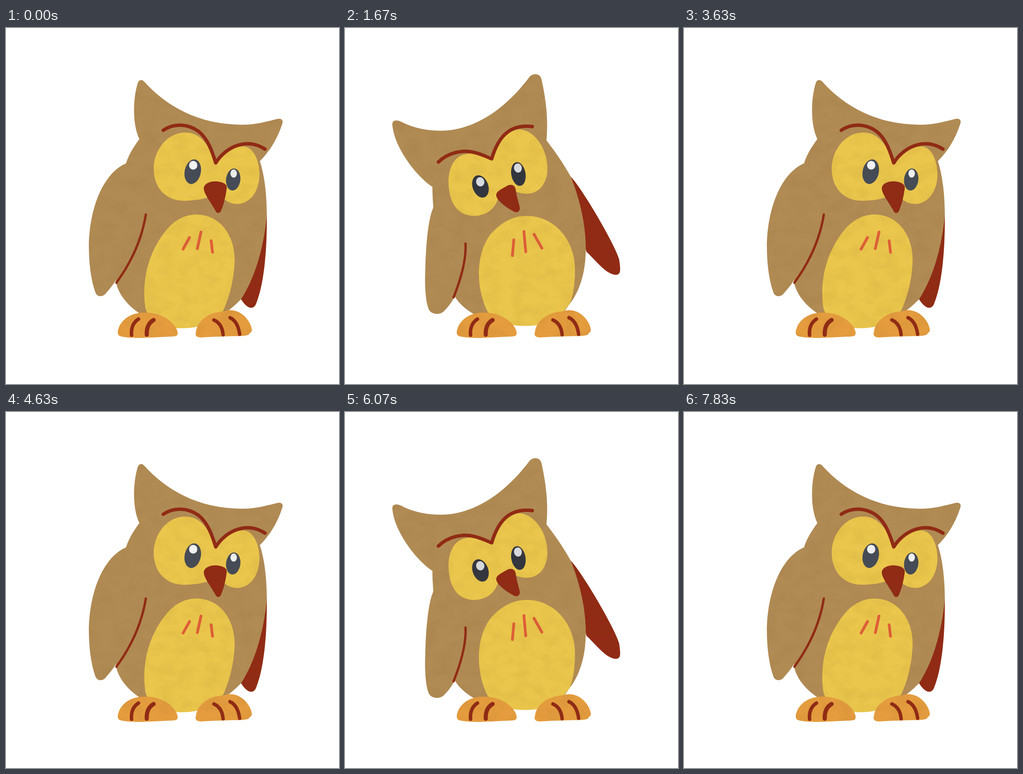
Recreate the animation shown at these times as an HTML page. Size 724 by 773 pixels, loop 7.91 s.

```html
<!DOCTYPE html>
<html lang="en">
<head>
<meta charset="utf-8">
<title>Owl</title>
<style>
html, body { margin: 0; width: 100%; height: 100%; overflow: hidden; background: #fff; }
svg { display: block; width: 100vw; height: 100vh; }
.brown { fill: #b18b54; }
.yellow { fill: #eac64c; }
.red { fill: #912b15; }
.orange { fill: #e49c3e; }
.line { fill: none; stroke: #912b15; stroke-width: 7.5; stroke-linecap: round; stroke-linejoin: round; }
.thin { stroke-width: 5; }
.mark { stroke: #df5f38; stroke-width: 6; }
</style>
</head>
<body>
<svg viewBox="0 0 724 773">
  <filter id="paper" filterUnits="userSpaceOnUse" x="0" y="0" width="724" height="773" color-interpolation-filters="sRGB">
    <feTurbulence id="grain" type="fractalNoise" baseFrequency=".03 .04" numOctaves="5" seed="1"/>
    <feColorMatrix values="0 0 0 0 .45  0 0 0 0 .3  0 0 0 0 .1  .15 0 0 0 -.06"/>
    <feComposite operator="in" in2="SourceAlpha" result="mottle"/>
    <feMerge><feMergeNode in="SourceGraphic"/><feMergeNode in="mottle"/></feMerge>
  </filter>
  <g filter="url(#paper)">
    <g id="owl"></g>
    <path class="orange" d="M243 660C245 640 265 618 300 618C340 617 369 640 373 660C374 668 371 670 360 670C330 671 300 673 290 673C270 673 250 671 246 668C243 665 243 663 243 660Z
      M413 660C415 640 435 617 475 615C482 612 487 613 493 613C515 616 531 637 534 652C536 660 532 660 529 664C528 667 522 668 510 669C480 669 440 671 425 672C412 672 411 666 413 660Z"/>
    <path class="line" d="M288 632Q271 643 273 667M452 634Q470 642 472 666M487 629Q504 637 508 665"/>
    <path class="line" style="stroke-width:9" d="M321 634Q305 643 306 666"/>
  </g>
</svg>
<script>
const LOOP = 7910;

// Part name -> class, in drawing order. Ovals hold: cx cy rx ry angle.
const parts = {
  farWing: 'red', body: 'brown', wing: 'brown', wingLine: 'line thin', belly: 'yellow',
  marks: 'line mark', face: 'yellow', brow: 'line', beak: 'red',
  eye1: 'pupil', eye2: 'pupil', glint1: 'glint', glint2: 'glint'
};

// Looking right, wings folded
const right = {
  farWing: 'M567 400C568 470 563 550 544 598C540 608 534 609 527 606C520 602 515 595 511 589L530 450Z',
  body: 'M287 118C290 112 296 111 301 117C350 171 420 210 514 210C545 210 570 202 592 197C602 196 603 203 600 210C590 240 575 266 552 289C562 320 567 360 567 408C560 480 540 545 511 589C480 620 440 650 381 650C330 650 255 612 240 556C225 480 235 370 261 294C268 272 278 258 290 241C274 210 276 150 287 118Z',
  wing: 'M261 294C205 318 175 410 181 500C183 535 189 560 195 576C201 586 213 583 218 575C226 566 234 556 238 549L304 404L300 320Z',
  wingLine: 'M304 405C296 455 275 505 240 553',
  belly: 'M414 405C465 405 496 450 497 500C497 545 485 585 473 612C460 640 420 652 381 652C340 652 308 630 303 608C293 540 315 478 350 437C368 416 390 405 414 405Z',
  marks: 'M399 455L385 480M424 443L416 479M446 462L449 487',
  face: 'M388 227C425 226 443 258 456 294C470 272 495 257 515 257C540 258 551 290 551 318C551 355 530 382 503 382C490 382 480 377 474 371L440 367C425 373 405 375 387 375C345 375 321 345 321 304C322 265 350 228 388 227Z',
  brow: 'M342 222C365 206 396 208 418 224C438 239 448 267 456 293C476 260 522 236 563 263',
  beak: 'M430 349C430 338 443 333 455 333C468 333 481 338 480 347C478 365 473 385 467 398C464 403 459 403 456 398C448 382 431 362 430 349Z',
  eye1: '406 312 17.6 27 12', eye2: '494 329 15.5 24 7',
  glint1: '407 298 9 9.5 0', glint2: '495 316 7 9 0',
  pupil: '#454c57', glint: '#f2f3f5'
};

// Upright, wings opening
const middle = {
  farWing: 'M542 385C566 435 589 520 595 582C595 597 588 597 580 593C560 579 540 556 528 533L520 450Z',
  body: 'M252 118C256 110 263 109 269 117C310 164 385 190 458 190C500 190 545 184 578 173C588 171 591 178 589 186C580 222 560 252 529 278C537 310 540 350 542 385C546 470 530 545 485 612C460 640 430 649 388 649C310 649 234 580 214 505C200 450 205 400 219 345C228 310 245 280 257 260C240 215 243 150 252 118Z',
  wing: 'M219 345C175 390 142 440 128 490C120 515 116 540 116 558C116 568 124 568 130 565C155 548 185 523 214 505L296 440L290 370Z',
  wingLine: 'M295 440C270 460 240 483 211 503',
  belly: 'M414 397C465 397 498 455 499 500C501 545 492 590 479 615C460 640 430 650 388 650C350 650 325 640 316 619C295 560 298 490 335 448C358 422 385 397 414 397Z',
  marks: 'M395 457L387 485M417 446L416 481M443 461L448 484',
  face: 'M362 217C395 222 413 250 424 283C442 262 462 243 485 243C511 245 521 280 521 306C521 348 500 380 473 380C460 380 450 376 444 372L418 362C405 372 385 376 366 376C330 375 307 345 306 300C307 260 330 222 362 217Z',
  brow: 'M319 211C345 202 370 208 391 222C411 238 420 260 424 284C444 245 500 218 539 252',
  beak: 'M411 351C411 341 420 335 432 335C443 335 454 341 452 350C449 365 445 380 441 390C438 395 432 396 429 391C423 375 411 361 411 351Z',
  eye1: '377 307 15 27 9', eye2: '469 325 14 24 12',
  glint1: '380 294 8.5 9 0', glint2: '472 310 8 8.5 0',
  pupil: '#444b54', glint: '#e8e9eb'
};

// Tilted left, far wing out
const left = {
  farWing: 'M491 323C516 349 587 470 596 502C599 525 601 536 588 536C566 534 545 504 525 486L500 400Z',
  body: 'M103 210C102 200 112 199 121 203C150 218 180 223 210 223C285 222 352 172 402 105C410 98 423 98 427 110C438 160 442 200 438 244C462 275 478 300 491 323C530 420 540 535 487 601C470 630 440 645 392 645C320 647 262 622 238 582C200 520 180 450 192 390C191 375 190 360 190 345C150 318 106 255 103 210Z',
  wing: 'M192 390C180 415 175 480 174 545C174 580 178 605 184 614C190 622 207 624 216 614C225 605 233 594 238 584L262 467L250 420Z',
  wingLine: 'M262 468C264 505 250 550 236 585',
  belly: 'M395 408C455 408 500 460 500 525C500 560 495 585 488 600C465 630 440 647 392 647C350 647 320 635 308 612C284 560 284 490 317 447C340 422 365 408 395 408Z',
  marks: 'M367 460L364 494M389 442L393 486M411 448L428 478',
  face: 'M268 273C290 268 305 280 318 285C330 255 350 222 378 220C415 222 440 265 440 305C440 340 420 360 395 360C385 360 375 357 366 353L332 372C325 395 305 408 279 408C245 407 226 380 225 335C225 300 240 275 268 273Z',
  brow: 'M203 291C225 270 255 264 280 270C295 273 308 280 319 284C332 240 355 208 407 214',
  beak: 'M329 365C327 355 340 350 352 343C361 338 369 341 371 350C373 367 379 382 380 391C380 400 373 402 366 398C352 390 332 377 329 365Z',
  eye1: '294.5 344 17 25 -20', eye2: '377 317 15.5 26 -10',
  glint1: '294 334 9 10 -15', glint2: '376 304 8.5 10 -10',
  pupil: '#33363f', glint: '#d9dce0'
};

function blend(a, b, k) {
  const out = { pupil: a.pupil, glint: a.glint };
  for (const name in parts) {
    const to = b[name].match(/-?[\d.]+/g);
    let i = 0;
    out[name] = a[name].replace(/-?[\d.]+/g, n => +n + (to[i++] - n) * k);
  }
  return out;
}

// Halfway between the two leans, wings spread wide
const spread = {
  ...blend(middle, left, .5),
  farWing: 'M516 354C570 385 620 430 648 468C654 480 655 490 645 494C610 500 565 508 530 505L510 400Z',
  wing: 'M205 367C165 395 115 430 82 470C74 482 72 492 73 500C75 510 86 510 95 508C140 505 185 510 226 535L290 430L270 390Z',
  wingLine: 'M282 450C262 478 242 505 224 533'
};

const schedule = [
  [0, right], [1200, middle], [1430, spread], [1670, left],
  [3200, spread], [3430, middle], [3630, right],
  [5200, middle], [5400, spread], [5630, left],
  [7400, spread], [7630, middle], [7830, right]
];

const isOval = name => /^(eye|glint)/.test(name);
const owl = document.getElementById('owl');
const grain = document.getElementById('grain');
const nodes = {};
for (const name in parts) {
  const node = document.createElementNS('http://www.w3.org/2000/svg', isOval(name) ? 'ellipse' : 'path');
  node.setAttribute('class', parts[name]);
  nodes[name] = owl.appendChild(node);
}

function show(pose) {
  for (const name in parts) {
    const node = nodes[name];
    if (!isOval(name)) {
      node.setAttribute('d', pose[name]);
      continue;
    }
    const [x, y, rx, ry, angle] = pose[name].split(' ');
    node.setAttribute('rx', rx);
    node.setAttribute('ry', ry);
    node.setAttribute('transform', `translate(${x} ${y}) rotate(${angle})`);
    node.setAttribute('fill', pose[parts[name]]);
  }
}

let shownPose, shownSeed;
function frame() {
  const t = performance.now() % LOOP;
  const pose = schedule.filter(([start]) => start <= t).pop()[1];
  const seed = Math.floor(t / 110) + 1;
  if (pose !== shownPose) show(shownPose = pose);
  if (seed !== shownSeed) grain.setAttribute('seed', shownSeed = seed);
  requestAnimationFrame(frame);
}
frame();
</script>
</body>
</html>
```
